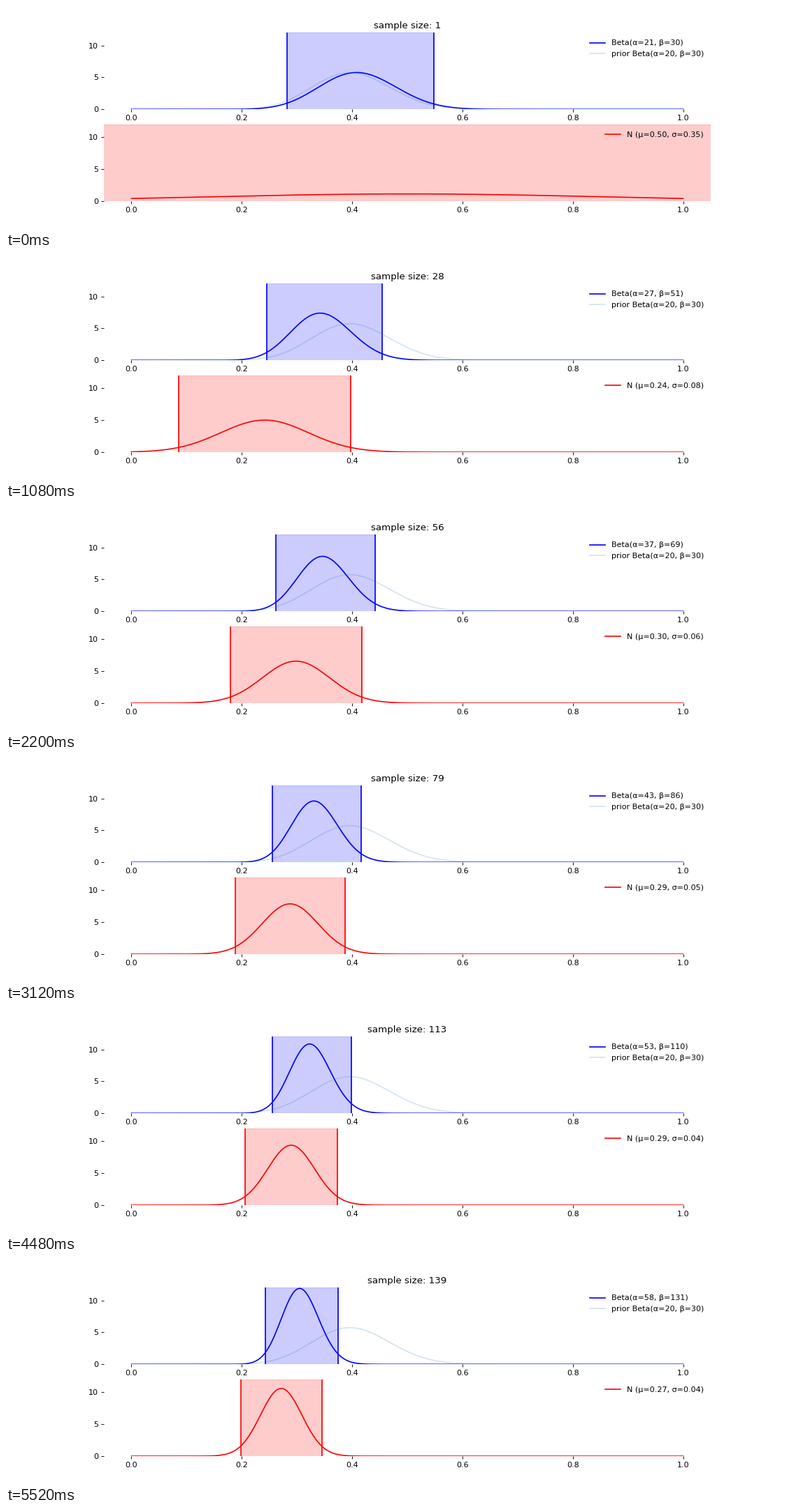
Write a matplotlib script that moves like this. It is 1120x320 px and loops after 5640 ms.

```python
from math import lgamma

import numpy as np
import matplotlib.pyplot as plt
from matplotlib.animation import FuncAnimation

FRAMES, STEP_MS = 141, 40
LAST_SAMPLE = 139
PRIOR_A, PRIOR_B = 20, 30
Z95 = 1.96

# Draws that came up positive; all others are negative.
HITS = [1, 3, 8, 13, 19, 22, 26, 30, 33, 35, 36, 38, 40, 43, 46, 50, 54,
        60, 63, 67, 71, 74, 78, 81, 85, 88, 91, 94, 96, 99, 102, 105, 108,
        118, 122, 126, 130, 134]

x = np.linspace(0, 1, 501)
fine = np.linspace(1e-6, 1 - 1e-6, 5001)


def beta_pdf(t, a, b):
    t = np.clip(t, 1e-12, 1 - 1e-12)
    log_norm = lgamma(a + b) - lgamma(a) - lgamma(b)
    return np.exp(log_norm + (a - 1) * np.log(t) + (b - 1) * np.log1p(-t))


def beta_interval(a, b):
    cdf = np.cumsum(beta_pdf(fine, a, b))
    return np.interp([0.025, 0.975], cdf / cdf[-1], fine)


def normal_pdf(t, mu, sigma):
    return np.exp(-0.5 * ((t - mu) / sigma) ** 2) / (sigma * np.sqrt(2 * np.pi))


class Panel:
    """A density curve with its shaded 95% interval."""

    def __init__(self, ax, color):
        self.ax = ax
        self.curve, = ax.plot(x, 0 * x, color=color, lw=1.5, label="curve")
        self.span = ax.axvspan(0, 1, color=color, alpha=0.2)
        self.edges = [ax.axvline(v, color=color, lw=1.5) for v in (0, 1)]
        ax.set(xlim=(-0.05, 1.05), ylim=(0, 12), yticks=[0, 5, 10])
        ax.spines[:].set_visible(False)

    def add_legend(self):
        legend = self.ax.legend(loc="upper right", frameon=False)
        self.label = legend.get_texts()[0]

    def show(self, y, low, high, text):
        self.curve.set_ydata(y)
        self.span.set_x(low)
        self.span.set_width(high - low)
        for edge, v in zip(self.edges, (low, high)):
            edge.set_xdata([v, v])
        self.label.set_text(text)


plt.rcParams["font.family"] = "DejaVu Sans"
fig, (top, bottom) = plt.subplots(2, 1, figsize=(14, 4), dpi=80)
fig.subplots_adjust(left=0.125, right=0.9, bottom=0.125, top=0.88, hspace=0.2)

posterior = Panel(top, "b")
top.plot(x, beta_pdf(x, PRIOR_A, PRIOR_B), color="C0", lw=1.5, alpha=0.2,
         label=f"prior Beta(α={PRIOR_A}, β={PRIOR_B})")
gauss = Panel(bottom, "r")
posterior.add_legend()
gauss.add_legend()
title = top.set_title("")


def update(i):
    n = min(i + 1, LAST_SAMPLE)
    hits = sum(h <= n for h in HITS)
    title.set_text(f"sample size: {n}")

    a, b = PRIOR_A + hits, PRIOR_B + n - hits
    posterior.show(beta_pdf(x, a, b), *beta_interval(a, b),
                   f"Beta(α={a}, β={b})")

    mu = hits / (n + 1)
    sigma = np.sqrt(mu * (1 - mu) / (n + 1))
    gauss.show(normal_pdf(x, mu, sigma), mu - Z95 * sigma, mu + Z95 * sigma,
               f"N (μ={mu:.2f}, σ={sigma:.2f})")
    return []


anim = FuncAnimation(fig, update, frames=FRAMES, interval=STEP_MS,
                     init_func=lambda: update(0), repeat=True, repeat_delay=0)
plt.show()
```
